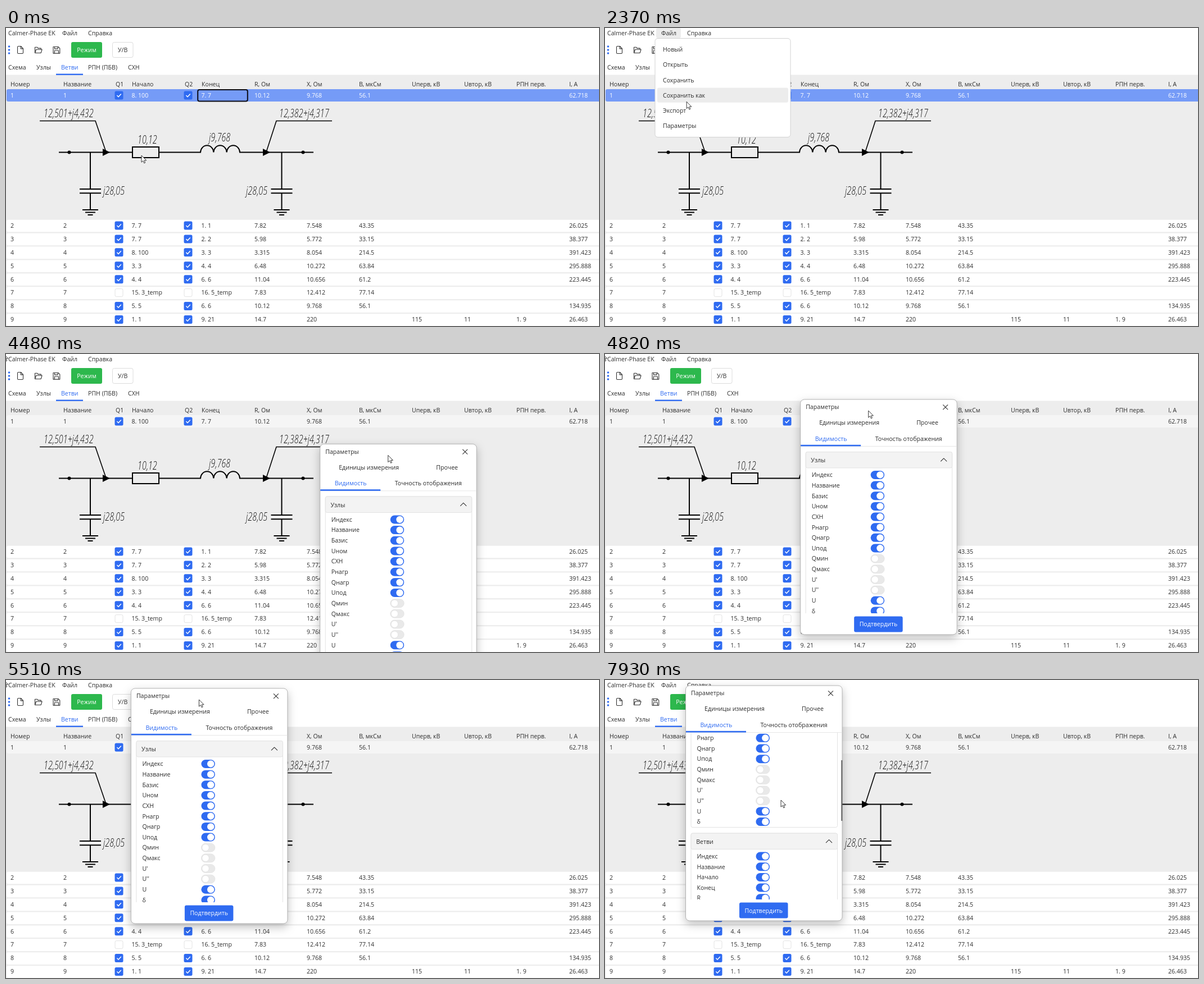
An HTML page for the animation above (8000 ms loop, 1055 by 531 pixels).

```html
<!DOCTYPE html>
<html lang="ru">
<head>
<meta charset="utf-8">
<title>Ветви</title>
<style>
html, body { margin: 0; width: 100%; height: 100%; overflow: hidden; background: #fff; }
svg { display: block; font: 10.6px "Open Sans", "Noto Sans", sans-serif; fill: #2e2e2e; }
.wire { fill: none; stroke: #000; stroke-width: 2; }
.thin { stroke-width: 1.6; }
.label { font: italic 300 20.5px "Open Sans", "Noto Sans", sans-serif; fill: #111; }
.icon { fill: none; stroke: #333; stroke-width: 1.1; stroke-linejoin: round; }
.blue { fill: #2f6bf1; }
.frame { fill: #fff; stroke: #a3a3a3; stroke-width: .8; filter: drop-shadow(0 6px 8px rgba(0,0,0,.25)); }
.card { fill: #fff; stroke: #e2e2e2; }
</style>
</head>
<body>
<svg id="stage" width="1055" height="531" viewBox="0 0 1055 531"></svg>
<script>
const LOOP = 8000;
const GRAY = '#ededed';
const text = (x, y, s, attrs = '') => `<text x="${x}" y="${y + 3.8}" ${attrs}>${s}</text>`;
const rect = (x, y, w, h, attrs = '') => `<rect x="${x}" y="${y}" width="${w}" height="${h}" ${attrs}/>`;
const path = (d, cls) => `<path d="${d}" class="${cls}"/>`;

// Main window
const columns = [8, 102, 195, 224, 318, 348, 442, 535, 628, 722, 815, 908, 1002];
const headings = 'Номер|Название|Q1|Начало|Q2|Конец|R, Ом|X, Ом|B, мкСм|Uперв, кВ|Uвтор, кВ|РПН перв.|I, А'.split('|');
const branches = `8. 100|7. 7|10.12|9.768|56.1||||62.718
7. 7|1. 1|7.82|7.548|43.35||||26.025
7. 7|2. 2|5.98|5.772|33.15||||38.377
8. 100|3. 3|3.315|8.054|214.5||||391.423
3. 3|4. 4|6.48|10.272|63.84||||295.888
4. 4|6. 6|11.04|10.656|61.2||||223.445
15. 3_temp|16. 5_temp|7.83|12.412|77.14||||
5. 5|6. 6|10.12|9.768|56.1||||134.935
1. 1|9. 21|14.7|220||115|11|1. 9|26.463`.split('\n').map(line => line.split('|'));

function checkbox(cx, cy, on) {
  const x = cx - 7.5, y = cy - 7.5;
  return on
    ? rect(x, y, 15, 15, 'rx="2.5" class="blue"') +
      `<path d="M${cx - 3.6} ${cy}l2.6 2.7 4.8-5.2" fill="none" stroke="#fff" stroke-width="1.5"/>`
    : rect(x + .5, y + .5, 14, 14, 'rx="2.5" fill="#fff" stroke="#e2e2e2"');
}

function tableRow(cells, i) {
  const y = i ? 352 + 23.93 * (i - 1) : 120;
  const [from, to, ...rest] = cells;
  const on = !from.includes('temp');
  const values = [i + 1, i + 1, '', from, '', to, ...rest];
  return (i ? rect(1, y - 10.3, 1060, 21.6, 'rx="3" fill="#fff"') : rect(1, 109, 1060, 22, 'rx="3" id="firstRow"')) +
    `<g ${i ? '' : 'id="firstText"'}>` +
    values.map((v, c) => v === '' ? '' : text(columns[c] - (c === 5 || c === 3 ? .6 : 0), y, v)).join('') + '</g>' +
    checkbox(201, y, on) + checkbox(324, y, on);
}

function shunt(x) {
  return path(`M${x} 221.5V287M${x - 19} 287h38M${x - 19} 294.3h38M${x} 294.3V324M${x - 14} 324h28M${x - 9} 328.6h18M${x - 4.5} 333h9`, 'wire');
}

// One condensed technical lettering style for every schematic label
const label = (x, y, s) => `<text class="label" transform="translate(${x} ${y}) scale(.7 1)">${s}</text>`;

function schematic() {
  const dot = x => `<circle cx="${x}" cy="221.5" r="3" fill="#000"/>`;
  const arrow = x => `<path d="M${x} 215l13 6.5-13 6.5z" fill="#000"/>`;
  return path('M94 221.5H225M272 221.5H346' + 'a11.67 12.5 0 0 1 23.33 0'.repeat(3) + 'H547M225 212h47v19h-47z', 'wire') +
    path('M60 165.5H159L178 221M580 165.5H481L463 221', 'wire thin') +
    dot(112.5) + dot(528.5) + arrow(172) + arrow(457) + shunt(150) + shunt(490.5) +
    label(67, 158.5, '12,501+j4,432') + label(486, 158.5, '12,382+j4,317') +
    label(234, 206, '10,12') + label(361, 201.5, 'j9,768') +
    label(173, 296.5, 'j28,05') + label(427, 296.5, 'j28,05');
}

function toolbar() {
  return rect(91, 0, 44, 18, 'rx="3" fill="#ececec" id="fileHover"') +
    text(4, 9, 'Calmer-Phase EK') + text(100, 9, 'Файл') + text(146, 9, 'Справка') +
    [33, 39, 45].map(y => `<circle cx="5.5" cy="${y}" r="1.8" class="blue"/>`).join('') +
    path('M20.5 34q0-1.5 1.5-1.5h4.5l4 4.2V44q0 1.5-1.5 1.5h-7q-1.5 0-1.5-1.5zM26.3 32.7v4.2h4', 'icon') +
    path('M51.5 44.5V34.2h4l1.6 1.9h5.2v2.2M51.5 44.5l2.2-6.2h10.4l-2 6.2z', 'icon') +
    path('M84 33.5h9l2.8 2.8v8.8H84zM86.5 33.5v3.6h5.6v-3.6M86.3 45v-4.8h7.2V45', 'icon') +
    rect(116, 25, 55, 28, 'rx="3" fill="#2db84d"') + text(143.5, 39, 'Режим', 'text-anchor="middle" fill="#fff"') +
    rect(189.5, 25.5, 36.5, 27, 'rx="3" fill="#fff" stroke="#dcdcdc"') + text(207.7, 39, 'У/В', 'text-anchor="middle"') +
    text(4, 70, 'Схема') + text(54, 70, 'Узлы') + text(98, 70, 'Ветви', 'class="blue"') +
    text(146, 70, 'РПН (ПБВ)') + text(217, 70, 'СХН') +
    rect(0, 83.4, 1055, 448, `fill="${GRAY}"`) + rect(89, 81.5, 48, 2.4, 'class="blue"');
}

// File menu
const menuItems = ['Новый', 'Открыть', 'Сохранить', 'Сохранить как', 'Экспорт', 'Параметры'];
const ITEM_TOP = 24.5, ITEM_H = 27.3;
function fileMenu() {
  return '<g id="menu">' + rect(89, 18.5, 241, 176, 'rx="5" fill="#fff" stroke="#d2d2d2"') +
    rect(93, 0, 233, ITEM_H - 1, 'rx="3" fill="#ececec" id="itemHover"') +
    menuItems.map((s, i) => text(103, ITEM_TOP + ITEM_H * (i + .5), s)).join('') + '</g>';
}

// Settings dialog, in its own coordinates
const PITCH = 18.65;
const nodeFields = ['Индекс', 'Название', 'Базис', 'Uном', 'СХН', 'Pнагр', 'Qнагр', 'Uпод', 'Qмин', 'Qмакс', "U'", "U''", 'U', 'δ'];
const branchFields = ['Индекс', 'Название', 'Начало', 'Конец', 'R', 'X'];
const hidden = new Set(['Qмин', 'Qмакс', "U'", "U''"]);

function toggle(y, on) {
  return rect(125, y - 7.5, 24.5, 15, on ? 'rx="7.5" class="blue"' : 'rx="7.5" fill="#e9e9e9" stroke="#dedede" stroke-width=".6"') +
    `<circle cx="${on ? 141.8 : 132.6}" cy="${y}" r="6.2" fill="#fff" ${on ? '' : 'stroke="#d8d8d8" stroke-width=".6"'}/>`;
}

function section(top, title, fields) {
  return rect(9.5, top, 260.5, 41 + fields.length * PITCH - 8.6, 'rx="3" class="card"') +
    rect(9.5, top, 260.5, 28.5, 'rx="3" fill="#f3f3f3" stroke="#e2e2e2"') +
    text(18.7, top + 15, title) + path(`M249.5 ${top + 17}l5.5-5.5 5.5 5.5`, 'icon') +
    fields.map((s, i) => {
      const y = top + 41 + i * PITCH;
      return text(20, y, s) + toggle(y, !hidden.has(s));
    }).join('');
}

function dialog() {
  return '<g id="dialog">' + rect(0, 0, 278.5, 419, 'rx="7" class="frame"') +
    text(9.5, 13.5, 'Параметры') + path('M253.6 9.4l8.8 8.8M262.4 9.4l-8.8 8.8', 'icon') +
    text(33.5, 41.5, 'Единицы измерения') + text(206.5, 41.5, 'Прочее') +
    text(26, 69.8, 'Видимость', 'class="blue"') + text(133, 69.8, 'Точность отображения') +
    rect(.5, 83, 277.5, .8, 'fill="#e0e0e0"') + rect(.5, 80.8, 107, 2.6, 'class="blue"') +
    '<g clip-path="url(#view)"><g id="content">' + section(93.5, 'Узлы', nodeFields) + section(397.5, 'Ветви', branchFields) + '</g></g>' +
    rect(277, 84, 1.6, 108, 'fill="#444" id="thumb"') +
    rect(95.5, 386.5, 86.5, 28, 'rx="3" class="blue"') + text(138.8, 400.7, 'Подтвердить', 'text-anchor="middle" fill="#fff"') + '</g>';
}

const pointer = id => `<path id="${id}" d="M0 0V12.2L2.9 9.6 4.8 13.9 6.7 13 4.9 8.9H8.7Z" fill="#fff" stroke="#222" stroke-width=".9"/>`;

document.getElementById('stage').innerHTML =
  `<defs><clipPath id="view">${rect(0, 84, 279, 297)}</clipPath></defs>` +
  toolbar() + headings.map((s, i) => text(columns[i], 100, s)).join('') +
  branches.map(tableRow).join('') +
  rect(341.2, 110, 88.6, 20.6, 'rx="3" fill="none" stroke="#0b0b14" stroke-width="2" id="focus"') +
  schematic() + fileMenu() + dialog() + pointer('corner') + pointer('cursor');

// Monotone cubic through [time, x, y] keys
function track(keys, t) {
  if (t <= keys[0][0]) return keys[0].slice(1);
  const i = keys.findIndex((k, n) => keys[n + 1] && t < keys[n + 1][0]);
  if (i < 0) return keys[keys.length - 1].slice(1);
  const span = keys[i + 1][0] - keys[i][0], u = (t - keys[i][0]) / span;
  return [1, 2].map(a => {
    const slope = n => keys[n] && keys[n + 1] ? (keys[n + 1][a] - keys[n][a]) / (keys[n + 1][0] - keys[n][0]) : 0;
    const tangent = n => {
      const p = slope(n - 1), q = slope(n);
      return p * q > 0 ? 2 * p * q / (p + q) : 0;
    };
    const d = keys[i + 1][a] - keys[i][a], v = u * u * (3 - 2 * u);
    return keys[i][a] + d * v + span * u * (1 - u) * (tangent(i) * (1 - u) - tangent(i + 1) * u);
  });
}

const dialogKeys = [[4410, 573, 167], [4820, 348, 81], [5210, 245, 75], [5510, 222.5, 15], [5980, 146, 11], [6310, 146, 11], [6380, 143.5, 10]];
const cursorKeys = [[720, 241, 227], [1330, 110, 26], [1520, 108, 8], [1950, 108, 8], [2580, 158, 174], [3510, 158, 174],
  [3780, 480, 136], [4000, 715, 165], [4110, 694, 187], [6720, 264, 30], [7270, 313, 214]];
const wheelTimes = [7500, 7570, 7730, 7930];

const el = id => document.getElementById(id);
const show = (id, on) => el(id).setAttribute('visibility', on ? 'visible' : 'hidden');
const move = (id, x, y) => el(id).setAttribute('transform', `translate(${x} ${y})`);

function draw(t) {
  const [dx, dy] = track(dialogKeys, t);
  const dragging = t >= 4110 && t < 6720;
  const [cx, cy] = dragging ? [dx + 121, dy + 20] : track(cursorKeys, t);
  const selected = t < 2810, scroll = wheelTimes.filter(w => t >= w).length * 33.6;
  const fade = Math.min(1, Math.max(0, (t - 3070) / 180));

  el('firstRow').setAttribute('fill', selected ? '#759bf7' : '#f5f5f5');
  el('firstText').setAttribute('fill', selected ? '#fff' : '#2e2e2e');
  show('focus', t < 1650);
  show('fileHover', t >= 1480 && t < 3070);
  show('menu', t >= 1650 && t < 2850);
  const item = Math.floor((cy - ITEM_TOP) / ITEM_H);
  show('itemHover', t >= 1950 && t < 2850 && item >= 0);
  el('itemHover').setAttribute('y', ITEM_TOP + ITEM_H * item);

  show('dialog', fade > 0);
  el('dialog').setAttribute('opacity', 1 - (1 - fade) ** 2);
  move('dialog', dx, dy);
  move('content', 0, -scroll);
  show('thumb', t >= 6720 && cy > 94);
  move('thumb', 0, scroll * .364);
  show('corner', t >= 4410 && t < 6550);
  move('corner', -5, -1);
  move('cursor', cx, cy);
}

const start = performance.now();
function tick() {
  draw((performance.now() - start) % LOOP);
  requestAnimationFrame(tick);
}
tick();
</script>
</body>
</html>
```
